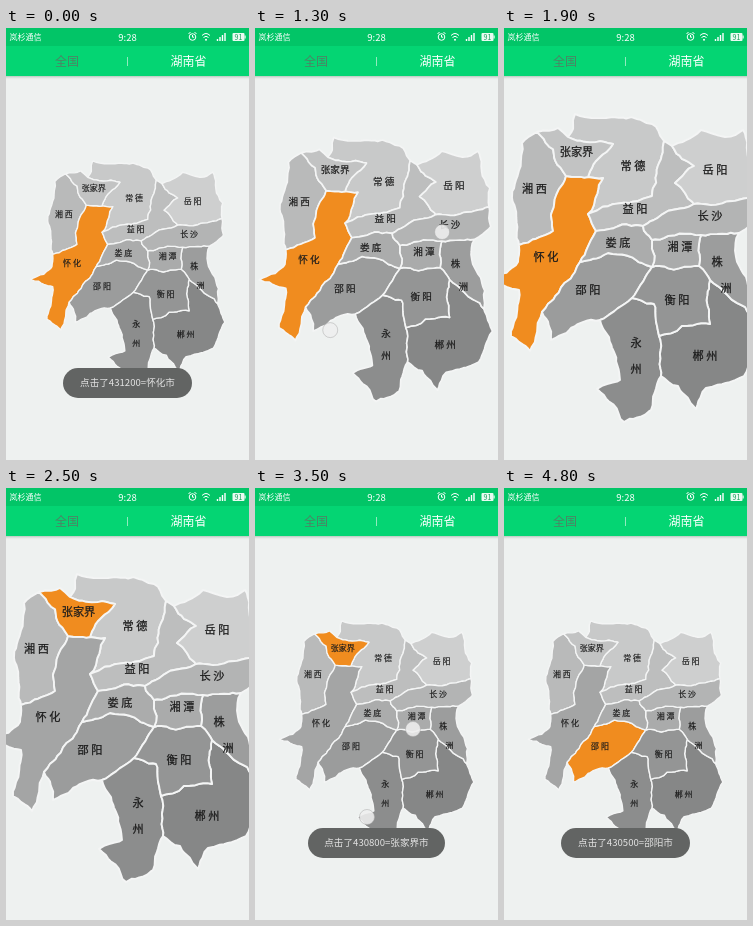
An HTML page for the animation above (4900 ms loop, 243 px wide and 432 px high).

```html
<!DOCTYPE html>
<html lang="zh">
<head>
<meta charset="utf-8">
<title>湖南省地图</title>
<style>
html, body { margin: 0; width: 100%; height: 100%; overflow: hidden; background: #eef1f0; }
svg { display: block; width: 100vw; height: 100vh; }
text { font-family: "Noto Sans CJK SC", "Noto Sans CJK", "Noto Sans", sans-serif; white-space: pre; }
#map path { stroke: #f4f5f5; stroke-width: 1.9; stroke-linejoin: round; }
#map text { font-size: 11.2px; text-anchor: middle; fill: #1c1c1c; stroke: #1c1c1c; stroke-width: .25; }
.bar text { fill: #fff; }
.mid { text-anchor: middle; }
#touches circle { fill: #eee; fill-opacity: .88; stroke: #aaa; stroke-opacity: .5; }
</style>
</head>
<body>
<svg viewBox="0 0 243 432" preserveAspectRatio="none">
  <defs>
    <linearGradient id="shade" x2="0" y2="1">
      <stop stop-color="#9fb5a8" stop-opacity=".7"/>
      <stop offset="1" stop-color="#eef1f0" stop-opacity="0"/>
    </linearGradient>
  </defs>
  <rect width="243" height="432" fill="#eef1f0"/>
  <g id="map"></g>
  <g class="bar">
    <rect y="48" width="243" height="4" fill="url(#shade)"/>
    <rect width="243" height="48" fill="#04d573"/>
    <rect width="243" height="18" fill="#02c567"/>
    <text x="3.500" y="12" font-size="8">岚杉通信</text>
    <text x="121.500" y="12.500" font-size="9.500" class="mid">9:28</text>
    <g fill="none" stroke="#fff">
      <circle cx="186.500" cy="9" r="3.300"/>
      <path d="M186.500 7v2.200h1.600M182.500 6l2-2M190.500 6l-2-2"/>
      <path d="M196 7.500q4-4 8 0M197.500 9.500q2.500-2.500 5 0"/>
      <path d="M211.500 13v-2M214 13v-4M216.500 13v-6M219 13v-8" stroke-width="1.400"/>
    </g>
    <circle cx="200" cy="11.800" r="1" fill="#fff"/>
    <rect x="226.500" y="5" width="12" height="8" rx="1" fill="#e9fbf1"/>
    <rect x="238.500" y="7.500" width="1.200" height="3" fill="#e9fbf1"/>
    <text x="232.500" y="11.500" font-size="7" class="mid" style="fill:#159a58">91</text>
    <text x="61" y="37.500" font-size="12" class="mid" style="fill:#4d8465">全国</text>
    <text x="182.500" y="37.500" font-size="12" class="mid">湖南省</text>
    <path d="M121.500 29v9" stroke="#b5f0d2" stroke-width=".8"/>
  </g>
  <g id="touches"></g>
  <g id="toast">
    <rect y="340" height="30" rx="15" fill="#626463"/>
    <text x="121.500" y="358.300" font-size="9.600" class="mid" fill="#e4e4e4"></text>
  </g>
</svg>
<script>
const LOOP = 4900, STEP = 100;
const CENTER = [126, 250], DRAWN_AT = 1.4;
const ORANGE = '#f08c1f';

// Corners of the borders; neighbours share them
const corners = {
  A: [33, 104], B: [54, 100], C: [64, 109], D: [71, 86], E: [102, 90], F: [148, 96],
  G: [160, 113], H: [168, 118], J: [197, 102], K: [221, 109], L: [239, 102], M: [253, 145],
  N: [252, 167], O: [254, 190], P: [235, 205], Q: [232, 229], R: [247, 265], S: [246, 286],
  T: [256, 312], U: [240, 348], V: [202, 360], W: [192, 381], X: [174, 358], Y: [157, 348],
  a: [147, 382], b: [120, 394], c: [93, 361], d: [116, 352], f: [96, 292], h: [47, 312],
  i: [38, 284], j: [26, 323], k: [7, 308], l: [15, 262], m: [-16, 252], n: [14, 234],
  o: [15, 217], p: [8, 170], q: [18, 115], r: [49, 203], t: [62, 148], v: [84, 149],
  w: [109, 116], x: [99, 150], y: [84, 186], z: [92, 203], 0: [76, 234], u: [104, 225],
  1: [148, 168], 3: [190, 138], 4: [171, 155], 5: [190, 176], 6: [139, 198], 7: [148, 212],
  8: [197, 207], 9: [195, 238], e: [148, 239], g: [128, 270], 2: [150, 276], s: [155, 308],
  Z: [206, 252], I: [206, 296]
};

// Name, grey level, corners in order, label centre
const regions = [
  ['常德', 200, 'CDEFG1yxvw', 129, 138],
  ['湘西', 185, 'Atropq', 30.5, 161],
  ['怀化', 164, 'tvxyz0ijklmnor', 42, 229],
  ['邵阳', 155, '0uegfhi', 84, 262],
  ['益阳', 189, 'y1GH3456z', 131, 181],
  ['岳阳', 206, 'HJKLMN543', 211, 142],
  ['永州', 140, 'g2sYabcdf', 132, 328],
  ['郴州', 134, 'ZSTUVWXYsI', 201, 328],
  ['株洲', 156, '8PQRSZ9', 217.5, 246.5],
  ['衡阳', 148, 'e9ZIs2g', 173, 272],
  ['湘潭', 170, '789e', 176, 219],
  ['娄底', 171, 'z67eu0', 114, 215],
  ['长沙', 179, '5NOP876', 206, 188],
  ['张家界', 194, 'ABCwvt', 72.5, 124]
];

// Tracks are [time, value] pairs, linear in between
const zoom = [[800, 1], [1300, 1.2], [1700, 1.4], [3050, 1.4], [3500, 1]];
const selections = [[0, '怀化'], [2400, '张家界'], [4100, '邵阳']];
const toasts = [
  { text: '点击了431200=怀化市', width: 129, alpha: [[1000, 1], [1200, 0]], until: 2000 },
  { text: '点击了430800=张家界市', width: 137, alpha: [[2500, 0], [2700, 1], [4300, 1], [4500, 0]], until: 4450 },
  { text: '点击了430500=邵阳市', width: 129, alpha: [[4400, 0], [4600, 1]], until: LOOP }
];
const touches = [
  { from: 800, to: 1700, x: [166, 204], y: [204, 204] },
  { from: 800, to: 1700, x: [103, 53], y: [296, 307] },
  { from: 2200, to: 2300, x: [75, 75], y: [122, 122] },
  { from: 2900, to: 3500, x: [178, 158], y: [195, 241] },
  { from: 2900, to: 3500, x: [90, 112], y: [392, 329] },
  { from: 4000, to: 4100, x: [97, 97], y: [262, 262] }
];

function valueAt(track, t) {
  const i = track.findIndex(([time]) => time > t);
  if (i === 0) return track[0][1];
  if (i < 0) return track[track.length - 1][1];
  const [t0, a] = track[i - 1], [t1, b] = track[i];
  return a + (b - a) * (t - t0) / (t1 - t0);
}

function add(parent, tag, attrs, text = '') {
  const el = document.createElementNS('http://www.w3.org/2000/svg', tag);
  for (const key in attrs) el.setAttribute(key, attrs[key]);
  el.textContent = text;
  return parent.appendChild(el);
}

function noise(x, y) {
  const n = Math.sin(x * 12.9898 + y * 78.233) * 43758.5453;
  return n - Math.floor(n) - .5;
}

// Midpoint displacement, the same from either end so that borders meet
function rough(a, b) {
  const length = Math.hypot(b[0] - a[0], b[1] - a[1]);
  if (length < 7) return [a];
  const x = (a[0] + b[0]) / 2, y = (a[1] + b[1]) / 2, sway = length * .2;
  const mid = [x + noise(x, y) * sway, y + noise(y, x) * sway];
  return [...rough(a, mid), ...rough(mid, b)];
}

function outline(keys) {
  const points = [...keys].flatMap((key, i) =>
    rough(corners[key], corners[keys[(i + 1) % keys.length]]));
  return 'M' + points.map(p => p.map(v => v.toFixed(1))).join(' ') + 'Z';
}

function addLabel(name, x, y) {
  const stacked = name === '永州' || name === '株洲';
  if (!stacked) return add(map, 'text', { x, y: y + 4 }, name.length === 2 ? [...name].join(' ') : name);
  const lean = name === '株洲' ? 4.5 : 0;
  [-1, 1].forEach((side, i) => add(map, 'text', { x: x + side * lean, y: y + 4 + side * 13 }, name[i]));
}

const map = document.getElementById('map');
const toast = document.getElementById('toast');
const [pill, message] = toast.children;
const touchLayer = document.getElementById('touches');

const shapes = regions.map(([name, grey, keys]) =>
  ({ name, fill: `rgb(${grey},${grey + 1},${grey + 1})`, el: add(map, 'path', { d: outline(keys) }) }));
for (const [name, , , x, y] of regions) addLabel(name, x, y);
const dots = touches.map(() => add(touchLayer, 'circle', { r: 7.5 }));

function draw(t) {
  const k = valueAt(zoom, t) / DRAWN_AT;
  const [cx, cy] = CENTER;
  map.setAttribute('transform', `translate(${cx} ${cy}) scale(${k}) translate(${-cx} ${-cy})`);

  const selected = selections.filter(([time]) => time <= t).pop()[1];
  for (const s of shapes) s.el.setAttribute('fill', s.name === selected ? ORANGE : s.fill);

  touches.forEach(({ from, to, x, y }, i) => {
    const along = ([a, b]) => valueAt([[from, a], [to, b]], t);
    dots[i].setAttribute('visibility', t >= from && t <= to ? 'visible' : 'hidden');
    dots[i].setAttribute('cx', along(x));
    dots[i].setAttribute('cy', along(y));
  });

  const { text, width, alpha } = toasts.find(item => t < item.until);
  toast.setAttribute('opacity', valueAt(alpha, t));
  pill.setAttribute('x', 121.5 - width / 2);
  pill.setAttribute('width', width);
  if (message.textContent !== text) message.textContent = text;
}

const start = performance.now();
function tick() {
  const t = (performance.now() - start) % LOOP;
  draw(Math.floor(t / STEP) * STEP);
  requestAnimationFrame(tick);
}
tick();
</script>
</body>
</html>
```
